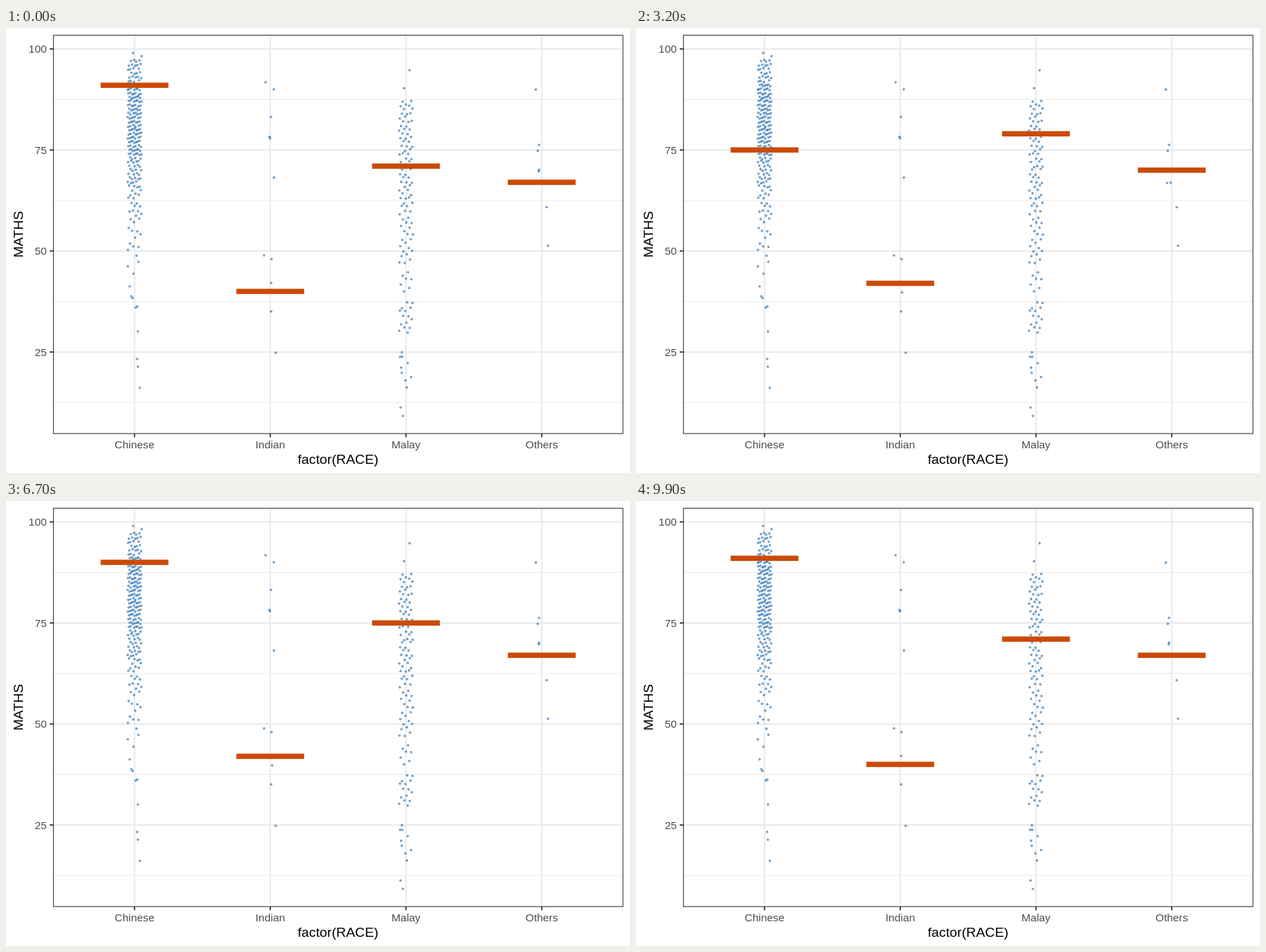
Animation, 885 px wide and 632 px high, one loop 10000 ms. Source, as an HTML page:

```html
<!DOCTYPE html>
<html lang="en">
<head>
<meta charset="utf-8">
<title>Maths scores by group</title>
<style>
  html, body { margin: 0; width: 100%; height: 100%; overflow: hidden; background: #fff; }
  svg { display: block; width: 885px; height: 632px; }
  text { font-family: "Liberation Sans", Arial, sans-serif; font-size: 15.4px; fill: #4d4d4d; }
  .title { font-size: 19.25px; fill: #000; }
  .mid { text-anchor: middle; }
  .end { text-anchor: end; }
  .major { stroke: #e8e8e8; stroke-width: 1.9; }
  .minor { stroke: #e8e8e8; stroke-width: 1; }
  .tick { stroke: #333; stroke-width: 1.8; }
  .dot { fill: #0f62ac; fill-opacity: .6; }
  .bar { fill: #cb4a06; }
  .frame { fill: none; stroke: #333; stroke-width: 1.1; }
</style>
</head>
<body>
<svg id="plot" viewBox="0 0 885 632"></svg>
<script>
const plot = document.getElementById('plot');
const groups = ['Chinese', 'Indian', 'Malay', 'Others'];
const left = 67.3, right = 875, upper = 10.3, lower = 576;
const xOf = i => 182.3 + 192.5 * i;
const yOf = v => 29.7 + 5.74 * (100 - v);

function add(tag, attrs, text) {
  const el = document.createElementNS('http://www.w3.org/2000/svg', tag);
  for (const k in attrs) el.setAttribute(k, attrs[k]);
  if (text) el.textContent = text;
  return plot.appendChild(el);
}
const line = (cls, x1, y1, x2, y2) => add('line', { class: cls, x1, y1, x2, y2 });
const label = (cls, x, y, text) => add('text', { class: cls, x, y }, text);
const dot = (cx, cy) => add('circle', { class: 'dot', cx, cy, r: 1.8 });

// Grid, axes and labels
for (let v = 12.5; v <= 100; v += 12.5) {
  const y = yOf(v);
  if (v % 25) { line('minor', left, y, right, y); continue; }
  line('major', left, y, right, y);
  line('tick', 62, y, left, y);
  label('end', 57.8, y + 5.6, String(v));
}
groups.forEach((name, i) => {
  line('major', xOf(i), upper, xOf(i), lower);
  line('tick', xOf(i), lower, xOf(i), 581.2);
  label('mid', xOf(i), 596.6, name);
});
label('title mid', 471, 619, 'factor(RACE)');
add('text', { class: 'title mid', transform: 'translate(23.6 293) rotate(-90)' }, 'MATHS');

// Dense bands: whole scores spread evenly from high to low, jittered sideways
let seed = 0;
function band(group, high, low, count) {
  for (let i = 0; i < count; i++) {
    seed++;
    const u = (seed * 0.618034) % 1, w = (seed * 0.754878) % 1;
    const score = Math.round(high + 0.5 - (high - low + 1) * (i + 0.5) / count);
    dot(xOf(group) - 9.8 + 19.6 * u, yOf(score) + (w - 0.5) * 3.4);
  }
}
band(0, 97, 92, 26);
band(0, 91, 84, 56);
band(0, 83, 74, 68);
band(0, 73, 66, 34);
band(0, 65, 58, 18);
band(0, 57, 49, 11);
band(2, 87, 79, 22);
band(2, 78, 74, 13);
band(2, 73, 61, 29);
band(2, 60, 47, 24);
band(2, 45, 40, 7);
band(2, 37, 30, 15);

// Sparse points: offset from the group's centre, then height
const sparse = [
  [-2, 35.5, 10, 40, 5.5, 332, -9.5, 338.5, -1.5, 349, -7, 367, -4.5, 381, -2.8, 383.5,
   1.6, 397, 4, 395.5, 4.8, 431, 3.7, 470, 4.7, 481, 7.5, 511],
  [-6.7, 77, 5, 87, 1, 126.3, -1.2, 154.6, -.3, 156.6, 5.2, 212.4, -8.8, 323, 1.8, 328.2,
   1.3, 362, 2.6, 375.5, 1.3, 402.6, 7.8, 461.3],
  [5, 60, -2.7, 85.5, -5.8, 460.6, -8.4, 467, -5.3, 467, 2.4, 476, -7, 482.4, -6, 489.8,
   7.3, 495.7, -.8, 500.5, 1.2, 510.6, -7.8, 539, -4.4, 551],
  [-8.3, 87.4, -3.8, 166, -5.6, 174.4, -3.7, 201.3, -4.3, 203.6, -6.5, 220, -1.6, 219.8,
   7, 254.5, 9, 309.3]
];
sparse.forEach((p, i) => {
  for (let k = 0; k < p.length; k += 2) dot(xOf(i) + p[k], p[k + 1]);
});

const bars = groups.map((_, i) =>
  add('rect', { class: 'bar', x: xOf(i) - 48.1, y: 0, width: 96.2, height: 7.5 }));
add('rect', { class: 'frame', x: left, y: upper, width: right - left, height: lower - upper });

// One drawn score per group in each step
const draws = [
  [91, 40, 71, 67], [95, 48, 16, 70], [86, 78, 11, 75], [85, 48, 65, 61], [80, 48, 58, 70],
  [78, 48, 24, 67], [80, 68, 63, 75], [90, 49, 24, 70], [75, 42, 79, 70], [78, 35, 63, 67],
  [91, 25, 74, 51], [94, 78, 71, 67], [78, 48, 63, 70], [91, 40, 62, 61], [55, 48, 47, 67],
  [92, 90, 16, 75], [23, 48, 63, 70], [90, 42, 75, 67], [78, 48, 65, 90], [84, 25, 63, 67],
  [69, 48, 63, 51], [74, 48, 65, 76], [78, 68, 87, 70], [74, 48, 11, 70], [91, 25, 63, 70]
];
const loop = 10000, blend = 100;
const startOf = k => 400 * k - (k > 12 ? 100 : 0);

function show(t) {
  let k = 0;
  while (k < draws.length && startOf(k + 1) <= t) k++;
  const now = draws[k % draws.length], next = draws[(k + 1) % draws.length];
  const mix = t >= startOf(k + 1) - blend ? 0.5 : 0;
  bars.forEach((b, i) =>
    b.setAttribute('y', yOf(now[i] + (next[i] - now[i]) * mix) - 3.75));
}

const begin = performance.now();
function tick() {
  show((performance.now() - begin) % loop);
  requestAnimationFrame(tick);
}
tick();
</script>
</body>
</html>
```
